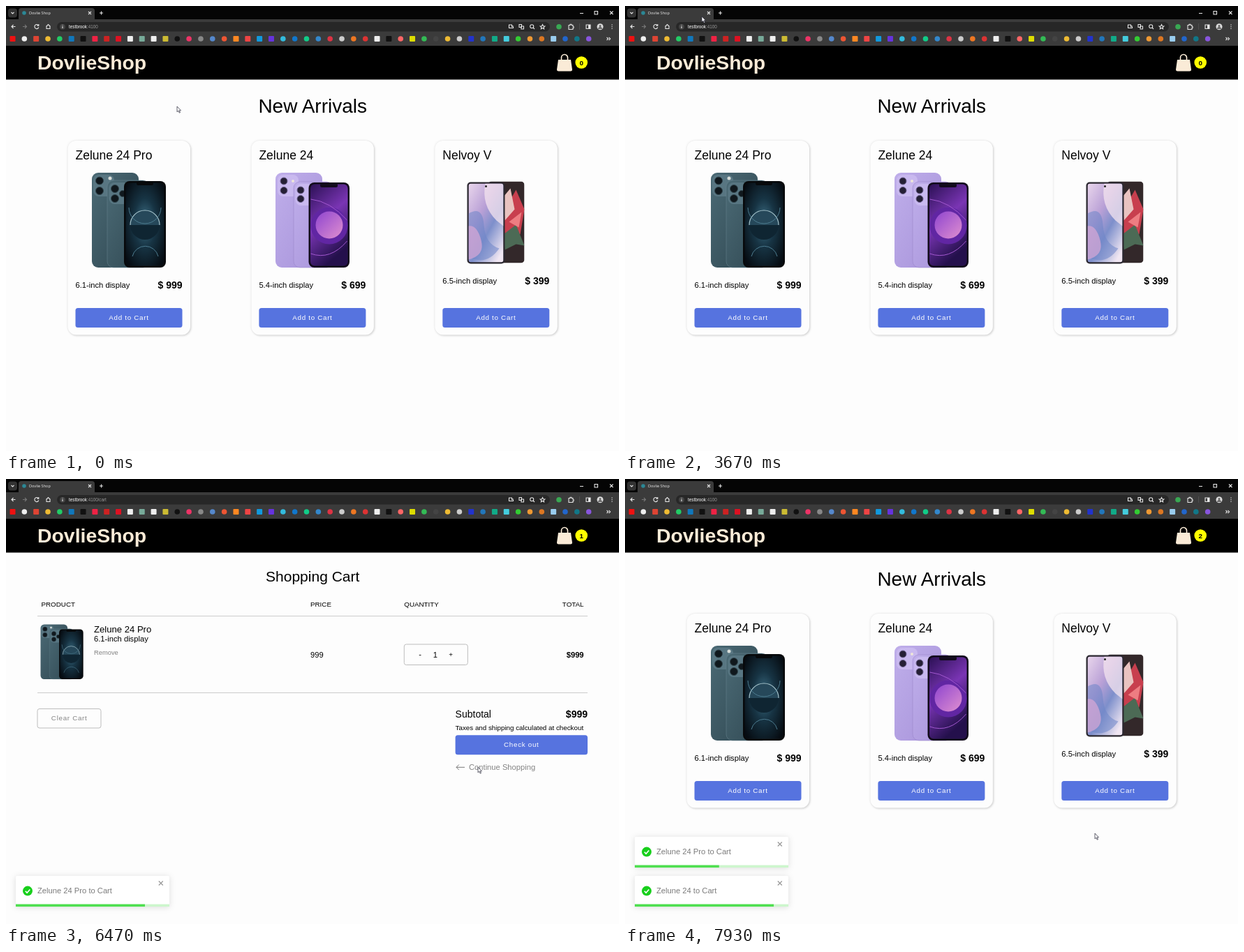
An HTML page for the animation above (8 s loop, 878 by 638 pixels).

```html
<!DOCTYPE html>
<html lang="en">
<head>
<meta charset="utf-8">
<title>Dovlie Shop</title>
<style>
html, body { margin: 0; width: 100%; height: 100%; overflow: hidden; background: #fdfdfd }
svg { display: block; width: 878px; height: 638px; font-family: "Liberation Sans", Arial, sans-serif }
.ui { font-family: "Open Sans", "Noto Sans", sans-serif }
.b { font-weight: bold }
.gray { fill: #848484 }
.line { stroke: #ccc; fill: none }
.box { stroke: #bdbdbd; fill: none }
.btn { fill: #5673df }
.btnText { fill: #fff; letter-spacing: .7px }
.card { fill: #fdfdfd; filter: drop-shadow(1.5px 1.5px 1.5px #0003) drop-shadow(-1px -1px 1px #0000000a) }
.toastBox { fill: #fff; filter: drop-shadow(0 1px 4px #0002) }
.icon { fill: none; stroke: #e6e6e6; stroke-width: 1.1 }

.home, .cart, .zero, .one, .two, .some, .shift, .lift, .arrow, .hand { animation: 8s step-end infinite }
.home { animation-name: home }
.cart { animation-name: cart }
.zero { animation-name: zero }
.one { animation-name: one }
.two { animation-name: two }
.some { animation-name: some }
.shift { animation-name: shift }
.lift { animation-name: lift }
.hand { animation-name: hand }
.arrow { animation-name: arrow }
@keyframes home { 0%, 81.75%, 97.5%, 100% { opacity: 1 } 65%, 85% { opacity: 0 } }
@keyframes cart { 0%, 81.75%, 97.5%, 100% { opacity: 0 } 65%, 85% { opacity: 1 } }
@keyframes zero { 0% { opacity: 1 } 65%, 100% { opacity: 0 } }
@keyframes one { 0%, 85%, 100% { opacity: 0 } 65% { opacity: 1 } }
@keyframes two { 0% { opacity: 0 } 85%, 100% { opacity: 1 } }
@keyframes some { 0% { opacity: 0 } 65%, 100% { opacity: 1 } }
@keyframes shift { 0% { transform: none } 85%, 100% { transform: translateY(109.7px) } }
@keyframes lift { 0% { transform: none } 85%, 100% { transform: translateY(-56px) } }
@keyframes hand { 0%, 65%, 85%, 100% { opacity: 0 } 59.5%, 83.8% { opacity: 1 } }
@keyframes arrow { 0%, 65%, 85%, 100% { opacity: 1 } 59.5%, 83.8% { opacity: 0 } }

/* toasts share one 8s cycle, offset by their start */
.toast { animation: bounce 8s cubic-bezier(.215,.61,.355,1) var(--d) infinite }
.bar { transform-origin: 14px 0; animation: drain 8s linear var(--d) infinite }
@keyframes bounce {
  0% { opacity: 0; transform: translateX(-3000px) }
  5.25% { opacity: 1; transform: translateX(25px) }
  6.5625% { transform: translateX(-10px) }
  7.875% { transform: translateX(5px) }
  8.75%, 100% { opacity: 1; transform: none }
}
@keyframes drain { 0%, 8.75% { transform: none } 71.25%, 100% { transform: scaleX(0) } }

.pointer { animation: move 8s ease-in-out infinite }
@keyframes move {
  0%, .8% { transform: translate(245px,144px) }
  5%, 10% { transform: translate(248px,143px) }
  13.4% { transform: translate(250px,142px) }
  16.6% { transform: translate(252px,142px) }
  23.4% { transform: translate(631px,259px) }
  25%, 27.5% { transform: translate(630px,257px) }
  37.5%, 38.2% { transform: translate(361px,481px) }
  40.9%, 45% { transform: translate(238px,9px) }
  45.85%, 46% { transform: translate(110px,15px) }
  54.1%, 57.5% { transform: translate(257px,422px) }
  62.5%, 65% { transform: translate(205px,444px) }
  80%, 81.75% { transform: translate(676px,413px) }
  84.4%, 87.5% { transform: translate(503px,443px) }
  96%, 100% { transform: translate(673px,508px) }
}
</style>
</head>
<body>
<svg id="stage" viewBox="0 0 878 638">
  <defs>
    <linearGradient id="steel" x2="1" y2="1"><stop stop-color="#4b6a75"/><stop offset="1" stop-color="#2f4751"/></linearGradient>
    <linearGradient id="lilac" x2="1" y2="1"><stop stop-color="#bfaeea"/><stop offset="1" stop-color="#a793da"/></linearGradient>
    <radialGradient id="night" cy=".48" r=".65"><stop stop-color="#3f7288"/><stop offset=".45" stop-color="#173444"/><stop offset="1" stop-color="#060c12"/></radialGradient>
    <linearGradient id="orb" x2="1" y2="1"><stop stop-color="#8e45cf"/><stop offset="1" stop-color="#e08fd0"/></linearGradient>
    <linearGradient id="violet" x2=".4" y2="1"><stop stop-color="#2c1155"/><stop offset=".5" stop-color="#7a35b4"/><stop offset="1" stop-color="#24104c"/></linearGradient>
    <linearGradient id="mist" x2=".8" y2="1"><stop stop-color="#e9d6ec"/><stop offset=".4" stop-color="#b9a0d6"/><stop offset=".65" stop-color="#7d8fcb"/><stop offset="1" stop-color="#f0e6f2"/></linearGradient>
    <clipPath id="backClip"><rect x="30" width="52" height="117" rx="5"/></clipPath>
    <clipPath id="frontClip"><rect x="2" y="3" width="50" height="113" rx="4"/></clipPath>

    <g id="phoneA">
      <rect width="67" height="136" rx="9" fill="url(#steel)"/>
      <rect x="2" y="3" width="30" height="31" rx="8" fill="#587682"/>
      <rect x="22" y="11" width="60" height="125" rx="9" fill="url(#steel)" stroke="#6b8792" stroke-width=".5"/>
      <rect x="24.500" y="14" width="30" height="31" rx="8" fill="#587682"/>
      <g fill="#10181d" stroke="#33474f"><circle cx="11" cy="11.500" r="5.500"/><circle cx="11" cy="26" r="5.500"/><circle cx="33" cy="23" r="5.500"/><circle cx="33" cy="37" r="5.500"/><circle cx="44" cy="30" r="4.500"/></g>
      <circle cx="26" cy="8" r="2.500" fill="#d7dcd8"/>
      <rect x="46" y="12" width="60" height="124" rx="8" fill="#07090b"/>
      <rect x="48.500" y="14.500" width="55" height="119" rx="6" fill="url(#night)"/>
      <circle cx="76" cy="75" r="21" fill="#0f2532"/>
      <path d="M55 75a21 21 0 0 1 42 0" fill="#26485a" stroke="#a5c3cb" stroke-width="1.200"/>
      <path d="M53 50a23 23 0 0 0 46 0M58 120a19 19 0 0 1 37 0" fill="none" stroke="#4d7c90"/>
      <rect x="64" y="13" width="24" height="5" rx="2.500" fill="#07090b"/>
    </g>
    <g id="phoneB">
      <rect width="67" height="136" rx="9" fill="url(#lilac)"/>
      <rect x="3" y="3" width="30" height="31" rx="8" fill="#c9b9ef"/>
      <rect x="26" y="13" width="56" height="123" rx="9" fill="url(#lilac)" stroke="#9a87cc" stroke-width=".6"/>
      <rect x="28.500" y="16" width="26" height="31" rx="8" fill="#c9b9ef"/>
      <g fill="#251f35" stroke="#6f6390"><circle cx="12" cy="12" r="5"/><circle cx="12" cy="25.500" r="5"/><circle cx="36" cy="25" r="5"/><circle cx="36" cy="37.500" r="5"/></g>
      <circle cx="25" cy="12" r="2" fill="#eee6d8"/>
      <rect x="47.500" y="14" width="58.500" height="122" rx="8" fill="#120b1c"/>
      <rect x="50" y="16.500" width="53.500" height="117" rx="6" fill="url(#violet)"/>
      <circle cx="77" cy="76" r="26.500" fill="#6126a3"/>
      <circle cx="77" cy="75" r="19.500" fill="url(#orb)"/>
      <path d="M50.500 38q28 3 52 30M50.500 116q28 10 52-18" fill="none" stroke="#a257cf"/>
      <rect x="64" y="15" width="25" height="6" rx="2.500" fill="#120b1c"/>
    </g>
    <g id="phoneC">
      <g clip-path="url(#backClip)">
        <rect x="30" width="52" height="117" fill="#33282a"/>
        <path d="M52 44L70 12 82 40 76 76 54 78z" fill="#c83f4e"/>
        <path d="M52 22L62 10 68 40 54 56z" fill="#e9c3c0"/>
        <path d="M52 76L70 62 82 92 70 90 54 98z" fill="#4c6a55"/>
        <path d="M60 58L78 44 74 66z" fill="#ee7d82"/>
      </g>
      <rect y="1" width="54" height="117" rx="5" fill="#2b2830"/>
      <g clip-path="url(#frontClip)">
        <rect x="2" y="3" width="50" height="113" fill="url(#mist)"/>
        <path d="M2 46Q22 34 24 62T46 96Q28 122 2 108z" fill="#6e86c8" opacity=".55"/>
        <path d="M26 3Q20 34 42 56L52 64V3z" fill="#f4e4ef" opacity=".75"/>
        <path d="M2 64Q14 62 20 84T2 112z" fill="#d9a9d6" opacity=".7"/>
      </g>
      <circle cx="27" cy="7" r="1.500" fill="#222"/>
    </g>
  </defs>
</svg>
<script>
const text = (x, y, size, str, cls = '', extra = '') =>
  `<text x="${x}" y="${y}" font-size="${size}" class="${cls}" ${extra}>${str}</text>`;
const mid = 'text-anchor="middle"', end = 'text-anchor="end"';
const rect = (x, y, w, h, r, attrs) => `<rect x="${x}" y="${y}" width="${w}" height="${h}" rx="${r}" ${attrs}/>`;
const group = (cls, body, attrs = '') => `<g class="${cls}" ${attrs}>${body}</g>`;
const icon = (d, attrs = '') => `<path class="icon" d="${d}" ${attrs}/>`;
const dot = (x, y, r, fill) => `<circle cx="${x}" cy="${y}" r="${r}" fill="${fill}"/>`;
const button = (x, y, w, label) =>
  rect(x, y, w, 28, 3.5, 'class="btn"') + text(x + w / 2, y + 17, 9.8, label, 'btnText', mid);

// s = square, c = circle, followed by the colour
const marks = ('se11 ceee sd43 ceb3 c2c6 s17b s111 se24 sc22 sd12 seee s7a9 seee scb3 c111 ce36 c888 c58c ce53 sf82 ' +
  'se44 s19d s63d c3bd c17c c1c8 c38c cd34 cccc ce72 cd33 seee s111 cf66 sdd0 c3b5 c444 ceb3 cccc s23c ' +
  'c27b s1a8 s4cd c3c3 ce93 cd72 s9ce c26c c178 c85d').split(' ');

function browser() {
  const bookmarks = marks.map((m, i) => {
    const x = 9.5 + 16.84 * i, fill = '#' + m.slice(1);
    return m[0] === 's' ? rect(x - 4, 43, 8, 8, 1, `fill="${fill}"`) : dot(x, 47, 3.8, fill);
  }).join('');
  return rect(0, 0, 878, 20, 0, 'fill="#050505"') +
    rect(0, 19, 878, 38, 0, 'fill="#3b3b3b"') +
    rect(18, 3, 109, 20, 4, 'fill="#3b3b3b"') +
    rect(3, 3.5, 13, 13, 4, 'fill="#333"') +
    icon('M7.500 9l2 2 2-2M118 8l4 4m0-4l-4 4M134 10h5m-2.500-2.500v5M822 10.500h5M843 7.500h4.500v4.500H843zM865 7.500l4.500 4.500m0-4.500L865 12') +
    dot(26, 10, 2.8, '#2b8795') +
    text(33, 12.2, 5.6, 'Dovlie Shop', 'ui', 'fill="#eee"') +
    icon('M13.500 29.500h-5.500m2.500-2.500L8 29.500l2.500 2.500M46.500 28a3 3 0 1 0 .3 2.500M46.800 26v2.300h-2.300M58 29.500V32.500h5V29.500M57.500 29.500L60.500 26.500 63.500 29.500') +
    icon('M24 29.500h5.500m-2.500-2.500l2.500 2.500-2.500 2.500', 'style="stroke:#777"') +
    rect(73, 23, 706, 13.5, 6.7, 'fill="#272727"') +
    dot(81, 29.8, 4, '#444') + icon('M81 29v3M81 27.300v.8') +
    text(90, 32, 6.3, 'testbrook<tspan fill="#999">:4100</tspan>', '', 'fill="#fff"') +
    group('cart', text(131.5, 32, 6.3, '/cart', '', 'fill="#999"')) +
    icon('M724 27h-3.500v4.500h6V29.500M724.500 26.500v3l2-1M735 26.500h3.500v4H735zM738 29h3.500v4H738zM755 31l2 2') +
    '<circle class="icon" cx="753.200" cy="29.300" r="2.500"/>' +
    icon('M768.500 26.500l1 2.200 2.400.2-1.800 1.600.5 2.300-2.100-1.200-2.100 1.200.5-2.300-1.800-1.600 2.400-.2z') +
    dot(792, 29.7, 3.8, '#39a853') +
    icon('M806 27.500h2v-1.300h2v1.300h2v2h1v2h-1v2h-6zM831 27h6v5.500h-6z') +
    rect(821, 25, .8, 9, 0, 'fill="#555"') + rect(834, 27, 3, 5.5, 0, 'fill="#e6e6e6"') +
    dot(851, 29.7, 4.5, '#ddd') + dot(851, 28.5, 1.5, '#666') + '<path d="M848 33a3 3 0 0 1 6 0z" fill="#666"/>' +
    [27, 29.7, 32.4].map(y => dot(868, y, .7, '#e6e6e6')).join('') +
    bookmarks + icon('M860.500 45l2 2-2 2m3-4l2 2-2 2');
}

function header() {
  const count = (cls, n) => group(cls, text(824.2, 84.5, 9.8, n, 'b', mid));
  return rect(0, 57, 878, 48.5, 0, '') +
    text(45, 91, 28.4, 'DovlieShop', 'b', 'fill="#faebd7"') +
    '<path d="M791 77h18l2 14q0 2.500-2.500 2.500h-17q-2.500 0-2.500-2.500z" fill="#faebd7"/>' +
    '<path d="M795.500 81v-7a4.500 4.500 0 0 1 9 0v7" fill="none" stroke="#faebd7" stroke-width="1.700"/>' +
    dot(824.2, 81, 8.8, '#ff0') + count('zero', 0) + count('one', 1) + count('two', 2);
}

function card(i, name, info, price, phone, px, py, dy) {
  const x = 88.5 + 262.9 * i;
  return rect(x, 193, 175.5, 278.5, 12, 'class="card"') +
    text(x + 11, 220, 17.5, name) +
    `<use href="#${phone}" x="${px}" y="${py}"/>` +
    text(x + 11, 404 - dy, 11.2, info) +
    text(x + 164, 405 - dy, 14, '$ ' + price, 'b', end) +
    button(x + 11, 433, 153, 'Add to Cart');
}

const row = (cls, y, name, info, price, phone) => group(cls,
  `<use href="#${phone}" transform="translate(49.500 12) scale(.577)"/>` +
  text(126, 23, 13.1, name) + text(126, 36.7, 11.2, info) + text(126, 55.5, 9.35, 'Remove', 'gray') +
  text(436, 59, 11.2, price) + rect(570.3, 40.5, 91, 29.5, 3, 'class="box"') +
  text(591.3, 58, 11.2, '-') + text(611.7, 59, 11.2, '1') + text(634.3, 58, 9.8, '+') +
  text(827.6, 59, 11.2, '$' + price, 'b', end) +
  '<path class="line" d="M45 110H833"/>', `transform="translate(0 ${y})"`);

function cartPage() {
  const total = (cls, n) => group(cls, text(833, 342, 14, '$' + n, 'b', end));
  const head = text(439.2, 147, 21, 'Shopping Cart', '', mid) +
    text(50.5, 183, 9.8, 'PRODUCT') + text(436, 183, 9.8, 'PRICE') +
    text(570.3, 183, 9.8, 'QUANTITY') + text(827.5, 183, 9.8, 'TOTAL', '', end) +
    '<path class="line" d="M45 196.500H833"/>';
  const foot = rect(45, 329.5, 91, 27.5, 3, 'class="box"') +
    text(90.7, 346.3, 9.8, 'Clear Cart', 'gray', mid + ' letter-spacing=".7"') +
    text(643.6, 342, 14, 'Subtotal') + total('one', 999) + total('two', 1698) +
    text(643.6, 359.5, 9.8, 'Taxes and shipping calculated at checkout') +
    button(643.6, 367.3, 189.4, 'Check out') +
    '<path d="M657 413.300h-12m3.800-3.800l-3.800 3.800 3.800 3.800" fill="none" stroke="#777" stroke-width="1"/>' +
    text(663, 417.2, 11.2, 'Continue Shopping', 'gray');
  return head + row('', 196.5, 'Zelune 24 Pro', '6.1-inch display', 999, 'phoneA') +
    row('two', 306.2, 'Zelune 24', '5.4-inch display', 699, 'phoneB') + group('shift', foot);
}

const toast = (name, delay) => group('toast',
  rect(14, 569, 220, 44, 2, 'class="toastBox"') +
  dot(31, 590.6, 7, '#18cf1c') +
  '<path d="M27.800 590.800l2.300 2.400 4.200-4.700" fill="none" stroke="#fff" stroke-width="1.600"/>' +
  text(45, 594.3, 11.2, name + ' to Cart', '', 'fill="#7b7b7b"') +
  '<path d="M218.800 576.500l6 6m0-6l-6 6" stroke="#999" stroke-width="1.200"/>' +
  rect(14, 609.6, 220, 3.5, 0, 'fill="#cdf6cd"') +
  rect(14, 609.6, 220, 3.5, 0, 'class="bar" fill="#4fdf50"'), `style="--d:${delay}ms"`);

const pointer = group('pointer',
  '<path class="arrow" d="M0 0V7.800L1.900 6.200 3.200 9.200 4.500 8.600 3.200 5.800H5.500z" fill="#fff" stroke="#223" stroke-width=".7"/>' +
  '<path class="hand" d="M-1 1Q0-.6 1 1V4.200L4 5Q5.500 5.300 5.300 7L4.500 10.500H0L-2.400 7Q-2.500 5.600-1 6.600z" fill="#fff" stroke="#223" stroke-width=".7"/>');

document.getElementById('stage').insertAdjacentHTML('beforeend',
  rect(0, 0, 878, 638, 0, 'fill="#fdfdfd"') + browser() + header() +
  group('home', text(439.2, 153, 28, 'New Arrivals', '', mid) +
    card(0, 'Zelune 24 Pro', '6.1-inch display', 999, 'phoneA', 123, 239, 0) +
    card(1, 'Zelune 24', '5.4-inch display', 699, 'phoneB', 386, 239, 0) +
    card(2, 'Nelvoy V', '6.5-inch display', 399, 'phoneC', 660.5, 251.5, 6.5)) +
  group('cart', cartPage()) +
  group('some', group('lift', toast('Zelune 24 Pro', 4975 - 8000))) +
  group('two', toast('Zelune 24', 6755 - 8000)) +
  pointer);
</script>
</body>
</html>
```
